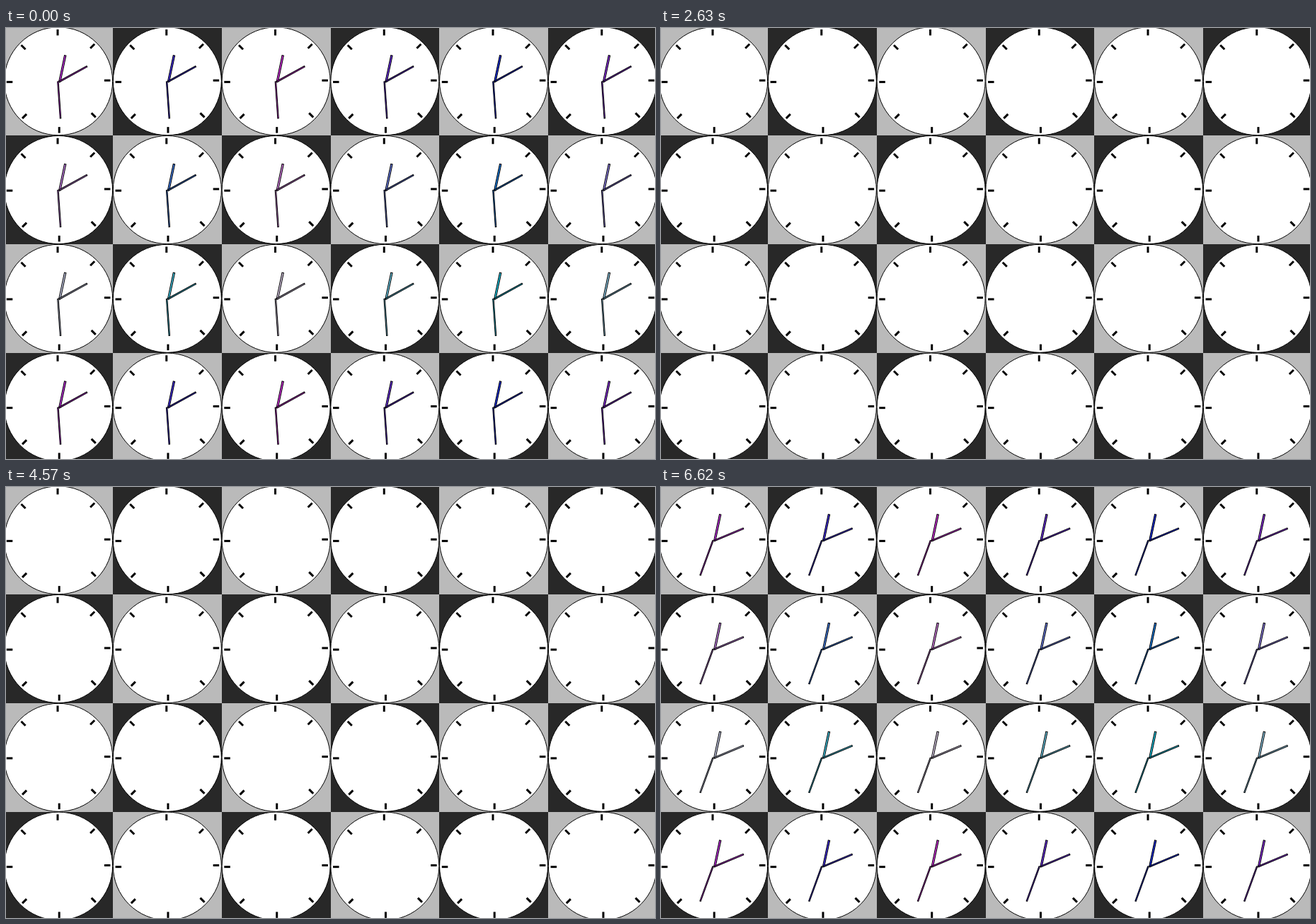
An HTML page with a canvas for the animation above (8000 ms loop, 917 by 610 pixels).

```html
<!DOCTYPE html>
<html lang="en">
<head>
<meta charset="utf-8">
<title>Clock wall</title>
<style>
html, body { margin: 0; width: 100%; height: 100%; overflow: hidden; background: #fff; }
canvas { display: block; }
</style>
</head>
<body>
<canvas id="stage" width="917" height="610"></canvas>
<script>
const ctx = document.getElementById('stage').getContext('2d');
const LOOP = 8000;
const COLS = 6, ROWS = 4;
const PITCH = 153.75, LEFT = -2.75, TOP = -1.6;
const CX = 74.1, CY = 75.3;
const RED = [195, 65, 215, 105, 20, 140];
const GREEN = [45, 125, 200, 45];
const BLUE = 228;

// Hands vanish at the start of each gap and return one second on.
const GAPS = [[680, 760], [2630, 2700], [4570, 4660], [6540, 6620]];
const rad = deg => deg * Math.PI / 180;

function eachTile(draw) {
  for (let row = 0; row < ROWS; row++) {
    for (let col = 0; col < COLS; col++) {
      ctx.save();
      ctx.translate(col * PITCH, row * PITCH);
      draw(col, row);
      ctx.restore();
    }
  }
}

function drawSquare(col, row) {
  ctx.fillStyle = (col + row) % 2 ? '#282828' : '#bababa';
  const x = Math.round(LEFT + col * PITCH), y = Math.round(TOP + row * PITCH);
  ctx.setTransform(1, 0, 0, 1, 0, 0);
  ctx.fillRect(x, y, 155, 155);
}

function drawFace() {
  ctx.translate(CX, CY);
  ctx.beginPath();
  ctx.arc(0, 0, 76.5, 0, 2 * Math.PI);
  ctx.fillStyle = '#fff';
  ctx.fill();
  ctx.strokeStyle = '#000';
  ctx.lineWidth = 1;
  ctx.stroke();
  ctx.fillStyle = '#000';
  for (let i = 0; i < 8; i++) {
    ctx.fillRect(-2.6, -73.3, 3, 8.5);
    ctx.rotate(Math.PI / 4);
  }
}

function drawHand(x, y, angle, width, length) {
  ctx.save();
  ctx.translate(x, y);
  ctx.rotate(rad(angle));
  ctx.beginPath();
  ctx.rect(-width / 2, -length, width, length);
  ctx.fill();
  ctx.stroke();
  ctx.restore();
}

function drawHands(col, row, step) {
  ctx.fillStyle = `rgb(${RED[col]},${GREEN[row]},${BLUE})`;
  ctx.strokeStyle = '#000';
  ctx.lineWidth = 1;
  drawHand(75.8, 76, 12, 2.4, 38);
  drawHand(75, 76, step ? 67.3 : 61.3, 1.6, 44.9);
  drawHand(73.4, 75.8, 176 + 6 * step, 1.5, 52.2);
}

function render(t) {
  const hidden = GAPS.some(([from, to]) => t >= from && t < to);
  const step = GAPS.filter(gap => t >= gap[1]).length;
  eachTile(drawSquare);
  eachTile(drawFace);
  if (!hidden) eachTile((col, row) => drawHands(col, row, step));
}

const start = performance.now();
function tick() {
  render((performance.now() - start) % LOOP);
  requestAnimationFrame(tick);
}
tick();
</script>
</body>
</html>
```
